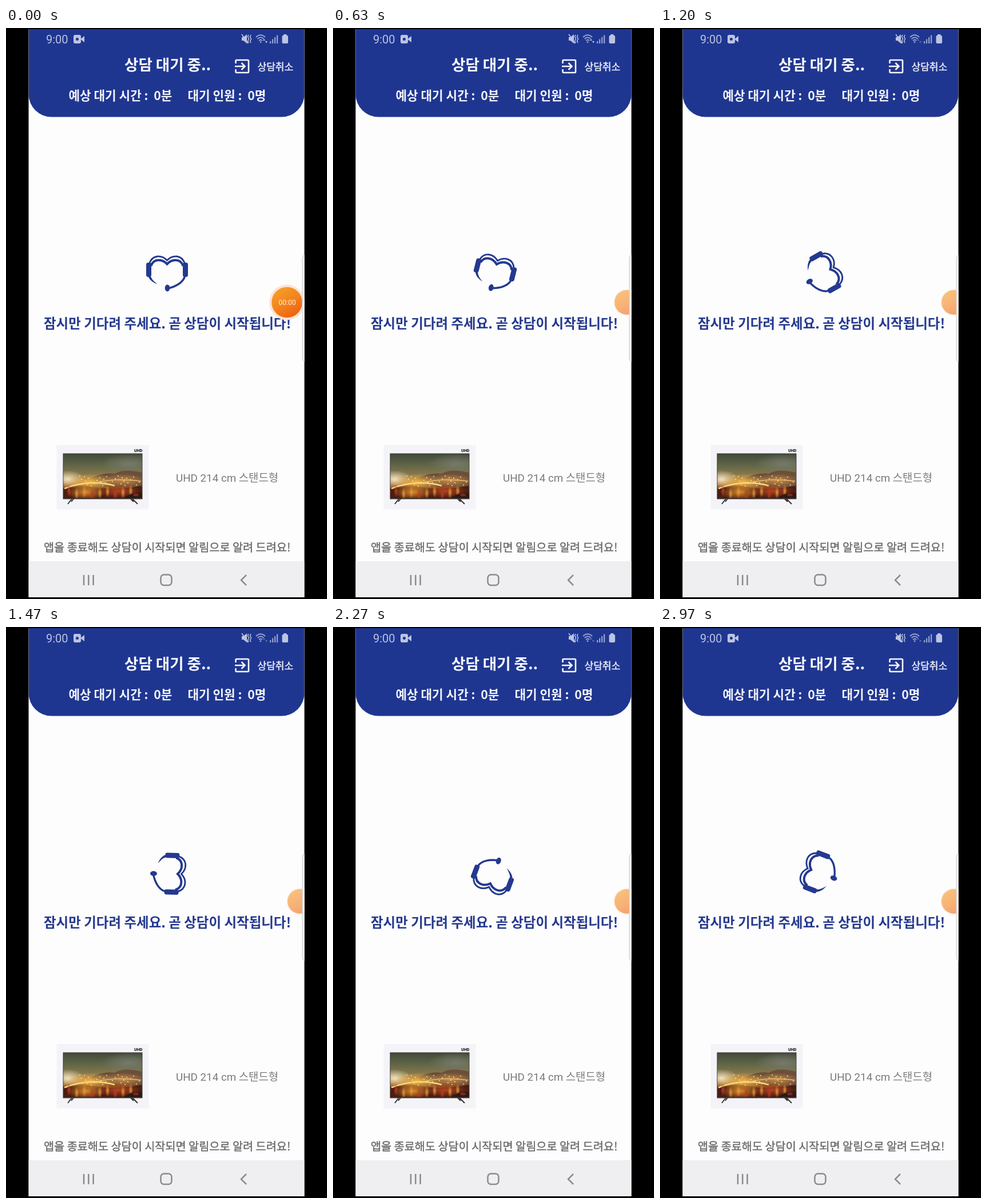
Recreate the animation shown at these times as an HTML page with a canvas. Size 561 by 998 pixels, loop 3000 ms.

```html
<!DOCTYPE html>
<html lang="ko">
<head>
<meta charset="utf-8">
<style>
html, body { margin: 0; width: 100%; height: 100%; overflow: hidden; background: #000; }
canvas { display: block; width: 561px; height: 998px; }
</style>
</head>
<body>
<canvas id="stage" width="561" height="998"></canvas>
<script>
const ctx = document.getElementById('stage').getContext('2d');
const LOOP = 3000;
const NAVY = '#24398f', HEADER = '#1f3691', STATUS = '#bcc4e2';
const KR = '"Noto Sans CJK KR", "Noto Sans CJK", sans-serif';
const ROBOTO = 'Roboto, "Noto Sans CJK KR", "Noto Sans CJK", sans-serif';

const clamp = v => Math.max(0, Math.min(1, v));
const mix = (a, b, k) => a + (b - a) * k;

function text(str, x, y, size, color, weight = 400, family = KR) {
  ctx.font = `${weight} ${size}px ${family}`;
  ctx.fillStyle = color;
  ctx.fillText(str, x, y);
}

// regular face with a hairline outline, for a medium weight
function mediumText(str, x, y, size, color) {
  text(str, x, y, size, color);
  ctx.strokeStyle = color;
  ctx.lineWidth = 0.4;
  ctx.strokeText(str, x, y);
}

function box(x, y, w, h, r, color) {
  ctx.fillStyle = color;
  ctx.beginPath();
  ctx.roundRect(x, y, w, h, r);
  ctx.fill();
}

function disc(x, y, rx, ry, color) {
  ctx.fillStyle = color;
  ctx.beginPath();
  ctx.ellipse(x, y, rx, ry, 0, 0, Math.PI * 2);
  ctx.fill();
}

function line(d, width, color) {
  ctx.lineWidth = width;
  ctx.strokeStyle = color;
  ctx.stroke(new Path2D(d));
}

function shape(d, color) {
  ctx.fillStyle = color;
  ctx.fill(new Path2D(d));
}

function ramp(x0, y0, x1, y1, ...colors) {
  const g = ctx.createLinearGradient(x0, y0, x1, y1);
  colors.forEach((c, i) => g.addColorStop(i / (colors.length - 1), c));
  return g;
}

function statusBar(t) {
  text('9:00', 70, 27, 20, STATUS, 400, ROBOTO);
  box(118, 12, 13, 15, 3, STATUS);
  shape('M130 19.5 L137 14 V25 Z', STATUS);
  disc(124.5, 19.5, 2.5, 2.5, HEADER);

  // muted speaker with vibration marks
  shape('M412 16 H415 L421 11 V27 L415 22 H412 Z', STATUS);
  line('M412 11 L423 27', 1.6, STATUS);
  line('M424 12 l-1.5 3 l2 4 l-2 4 l1.5 3 M428 12 l-1.5 3 l2 4 l-2 4 l1.5 3', 1.5, STATUS);

  ctx.globalAlpha = 0.75;
  line('M437 16 Q445 8.5 453 16 M439.5 19 Q445 14 450.5 19 M442 22 Q445 19.5 448 22', 1.8, STATUS);
  disc(445, 24.5, 1.5, 1.5, STATUS);
  for (let i = 0; i < 4; i++) box(461 + i * 4, 23 - i * 3.5, 2.2, 4 + i * 3.5, 0, STATUS);
  ctx.globalAlpha = t < 1200 ? 1 : 0.4;
  shape('M449 22 l2 -3 l2 3 Z M453 23 h4 l-2 3.5 Z', STATUS);
  ctx.globalAlpha = 1;

  box(485, 11, 5.5, 3, 1, STATUS);
  box(482.5, 13, 10.5, 14, 2, STATUS);
}

function header(t) {
  box(39.5, 2, 482, 153.5, [0, 0, 40, 40], HEADER);
  statusBar(t);
  text('상담 대기 중..', 207, 74, 26.5, '#f6f7fc', 700);
  mediumText('상담취소', 439.5, 73.5, 17, '#eef0fa');
  text('예상 대기 시간 :  0분', 109.5, 126, 21.3, '#f3f5fb', 700);
  text('대기 인원 :  0명', 317.5, 126, 21.3, '#f3f5fb', 700);
  line('M401.5 62 V57.5 Q401.5 56 403 56 H422.5 Q424 56 424 57.5 V76.5 Q424 78 422.5 78 H403 Q401.5 78 401.5 76.5 V72', 2.6, '#f6f7fc');
  line('M400 67 H417 M411.5 61 L417.5 67 L411.5 73', 2.6, '#f6f7fc');
}

// heart-shaped headset around its own pivot
function headset(t) {
  const x = clamp((t - 125) / 4000);
  ctx.save();
  ctx.translate(281.5, 431);
  ctx.rotate(Math.PI * (1 - Math.cos(Math.PI * x)));
  line('M-31 -19 C-26 -35 -10 -35 0 -25 C10 -35 26 -35 31 -19', 2.9, NAVY);
  line('M-28 -15 C-24 -28 -9 -28 0 -18.5 C9 -28 24 -28 28 -15', 4, NAVY);
  box(-36.5, -21, 9, 25, 3.5, NAVY);
  box(27.5, -21, 9, 25, 3.5, NAVY);
  shape('M-33 3 H-28.5 C-27 8 -23 12 -17 16.5 C-25 14 -31 9 -33 3 Z', NAVY);
  line('M31 3 C28 14 15 21 2 24', 3.4, NAVY);
  disc(0.5, 23.5, 4.3, 6, NAVY);
  ctx.restore();
}

function glow(x, y, rx, ry, color) {
  ctx.save();
  ctx.translate(x, y);
  ctx.scale(rx, ry);
  const g = ctx.createRadialGradient(0, 0, 0, 0, 0, 1);
  g.addColorStop(0, color);
  g.addColorStop(1, color + '00');
  ctx.fillStyle = g;
  ctx.fillRect(-1, -1, 2, 2);
  ctx.restore();
}

function television() {
  box(88.5, 729, 161, 112.5, 0, '#f4f4f8');
  text('UHD', 224, 740.5, 7.2, '#222', 900, ROBOTO);
  line('M115 823 L108 832 M118 823 L114 828 M221 823 L230 832 M218 823 L223 828', 2, '#333');
  box(99.5, 743.5, 139, 80, 0, '#3a3634');
  ctx.save();
  ctx.beginPath();
  ctx.rect(100.5, 744.5, 137, 77);
  ctx.clip();
  ctx.fillStyle = ramp(0, 744, 0, 822, '#414a39', '#5f6547', '#8d7a4c', '#8a4d1c', '#4a1f10');
  ctx.fillRect(100, 744, 138, 78);
  glow(215, 762, 50, 18, '#76796a');
  shape('M150 786 Q172 776 190 779 Q205 769 238 777 V802 H150 Z', '#6b4f3a');
  shape('M100 804 Q130 797 160 803 T238 800 V822 H100 Z', '#4a1d12');
  glow(108, 789, 30, 16, '#f2e6c4');
  glow(147, 794, 46, 15, '#f7b84a');
  glow(205, 791, 40, 12, '#c98c45');
  glow(140, 811, 34, 14, '#d98a2b');
  glow(196, 809, 40, 12, '#b0451f');
  line('M102 805 Q145 788 190 800', 2.6, '#fbd873');
  line('M160 794 Q195 786 236 792', 1.6, '#e8b873');
  for (let i = 0; i < 9; i++) {
    glow(110 + i * 13.5, 809 + (i * 5) % 8, 4, 11, i % 3 ? '#e59438' : '#bd3a20');
  }
  for (let i = 0; i < 30; i++) {
    box(128 + (i * 37) % 106, 782 + (i * 11) % 19, 1.9, 1.4, 0, '#ffe3a0');
  }
  shape('M205 822 Q220 810 238 813 V822 Z', '#2c1a18');
  disc(227, 816, 5, 2.5, '#7d2a1c');
  ctx.restore();
}

function navBar() {
  box(39.5, 932, 482, 63, 0, '#efeff1');
  const gray = '#8b8b8e';
  line('M136 956 V974 M144.3 956 V974 M152.6 956 V974', 2.5, gray);
  ctx.beginPath();
  ctx.roundRect(270.5, 955.5, 19, 18.5, 5.5);
  ctx.stroke();
  line('M420 956 L411 965 L420 974', 2.5, gray);
}

// recorder bubble docks at the screen edge and fades
function bubble(t) {
  const p = clamp((t - 100) / 270), k = p * p * (3 - 2 * p);
  const x = mix(491, 513.5, k), y = 479.5, r = mix(26.8, 21.5, k);
  const ring = r + mix(4.2, 1.5, k);
  ctx.globalAlpha = mix(1, 0.56, k);
  disc(x, y, ring, ring, '#fbe4d8');
  disc(x, y, r, r, ramp(x - r * 0.6, y - r, x + r * 0.6, y + r, '#f5a02a', '#f4831d', '#ee5d12'));
  ctx.globalAlpha = 1 - k;
  text('00:00', 476.3, 484, 12.2, '#fff0df', 400, ROBOTO);
  ctx.globalAlpha = 1;
}

function edgeHandle() {
  const d = 'M523 396 Q518 398 518 404 V576 Q518 582 523 584';
  shape(d, '#f3f3f4');
  line(d, 1.2, '#d2d2d4');
}

function draw(t) {
  ctx.fillStyle = '#000';
  ctx.fillRect(0, 0, 561, 998);
  ctx.save();
  ctx.beginPath();
  ctx.rect(39.5, 2, 482, 993);
  ctx.clip();
  ctx.fillStyle = '#fdfdfd';
  ctx.fillRect(39, 2, 483, 993);
  header(t);
  headset(t);
  text('잠시만 기다려 주세요. 곧 상담이 시작됩니다!', 66, 525, 23.5, NAVY, 700);
  television();
  text('UHD 214 cm 스탠드형', 297, 793, 18.8, '#7b7b7b', 400, ROBOTO);
  mediumText('앱을 종료해도 상담이 시작되면 알림으로 알려 드려요!', 66, 914.5, 19.7, '#6a6a6a');
  navBar();
  bubble(t);
  edgeHandle();
  ctx.restore();
}

const start = performance.now();
function tick() {
  draw((performance.now() - start) % LOOP);
  requestAnimationFrame(tick);
}
tick();
</script>
</body>
</html>
```
